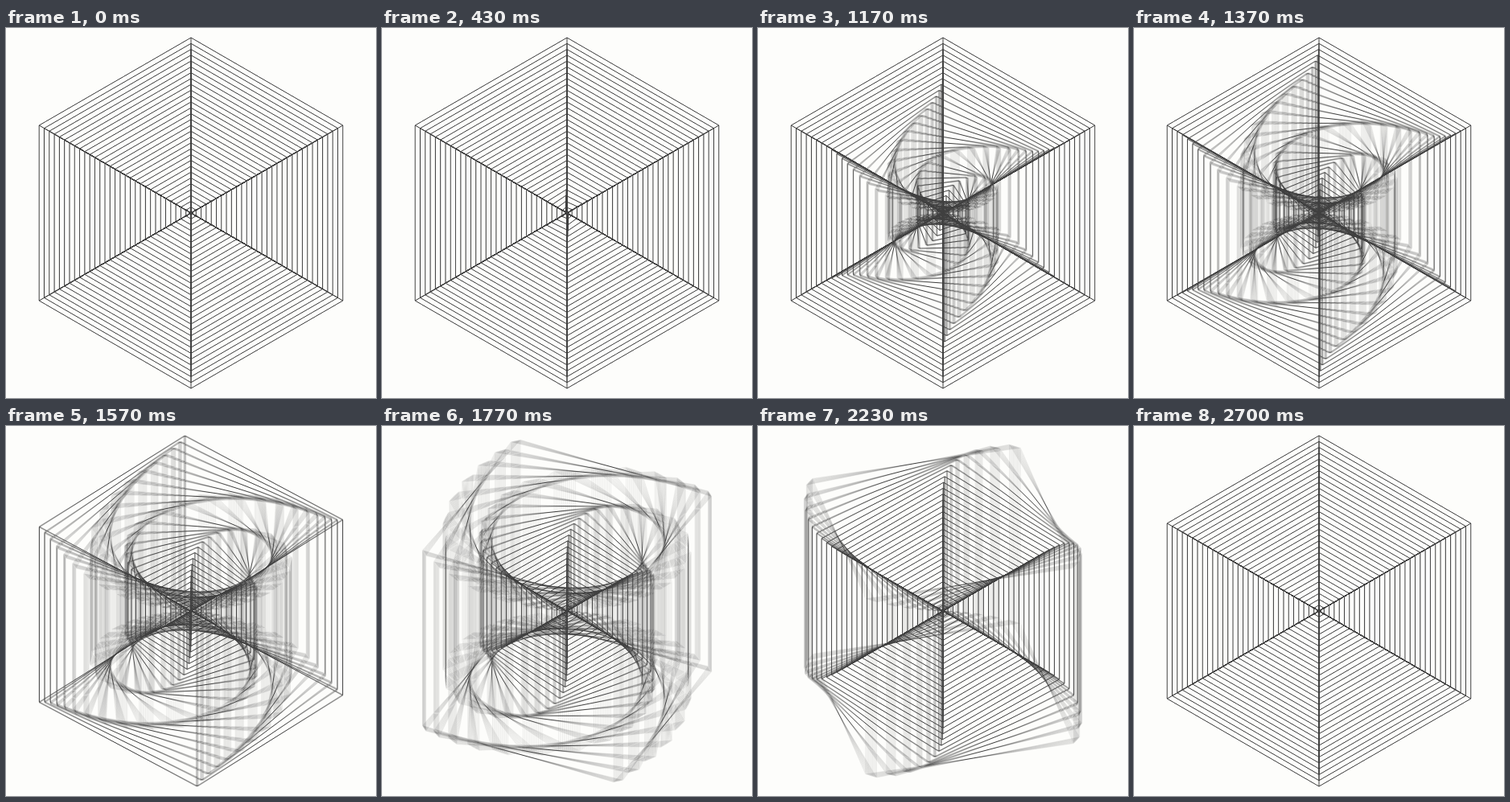
Write an HTML page with a canvas that moves like this. It is 460 px wide and 460 px high and loops after 2.76 s.

```html
<!DOCTYPE html>
<html lang="en">
<head>
<meta charset="utf-8">
<title>Nested turning cubes</title>
<style>
  html, body { margin: 0; width: 100%; height: 100%; overflow: hidden; background: #fdfdfb; }
  canvas { display: block; width: 100vmin; height: 100vmin; }
</style>
</head>
<body>
<canvas id="stage" width="460" height="460"></canvas>
<script>
const SIZE = 460;
const CENTER = SIZE / 2;
const LOOP = 2760;
const FRAME = 100 / 3;
const CUBES = 30;
const HALF_HEIGHT = 109;
const RADIUS = HALF_HEIGHT * Math.sqrt(3);
const TILT = 1 / Math.sqrt(3);

const FIRST_START = 70;
const STAGGER = 1305;
const TURN_TIME = 1300;
const SAMPLES = 12;
const SHUTTER = 0.8;

const stage = document.getElementById('stage').getContext('2d');
const layerCanvas = document.createElement('canvas');
layerCanvas.width = layerCanvas.height = SIZE;
const layer = layerCanvas.getContext('2d');
layer.strokeStyle = '#363636';
layer.lineWidth = 1;
layer.lineJoin = 'round';

const clamp = x => Math.min(1, Math.max(0, x));
const easeInOut = u => u < 0.5 ? 4 * u ** 3 : 1 - 4 * (1 - u) ** 3;

// One wireframe cube, seen isometrically, making a half turn about its upright axis.
function drawCube(scale, time) {
  const u = clamp((time - FIRST_START - STAGGER * scale) / TURN_TIME);
  const turn = Math.PI * easeInOut(u);
  const height = HALF_HEIGHT * scale;
  const corners = [0, 1, 2, 3].map(k => {
    const angle = turn + k * Math.PI / 2;
    return {
      x: CENTER - RADIUS * scale * Math.sin(angle),
      y: CENTER - RADIUS * scale * TILT * Math.cos(angle)
    };
  });
  layer.beginPath();
  for (const offset of [-height, height]) {
    corners.forEach((p, k) => layer[k ? 'lineTo' : 'moveTo'](p.x, p.y + offset));
    layer.closePath();
  }
  for (const p of corners) {
    layer.moveTo(p.x, p.y - height);
    layer.lineTo(p.x, p.y + height);
  }
  layer.stroke();
}

// Motion blur: the summed samples make an exact average.
function draw(time) {
  stage.clearRect(0, 0, SIZE, SIZE);
  stage.globalCompositeOperation = 'lighter';
  stage.globalAlpha = 1 / SAMPLES;
  for (let j = 0; j < SAMPLES; j++) {
    const shift = ((j + 0.5) / SAMPLES - 0.5) * SHUTTER * FRAME;
    layer.clearRect(0, 0, SIZE, SIZE);
    for (let i = 1; i <= CUBES; i++) drawCube(i / CUBES, time + shift);
    stage.drawImage(layerCanvas, 0, 0);
  }
}

const origin = performance.now();
let shown = -1;

function tick() {
  const time = (performance.now() - origin) % LOOP;
  const step = Math.floor((time + 5) / FRAME);
  if (step !== shown) {
    shown = step;
    draw(step * FRAME);
  }
  requestAnimationFrame(tick);
}
tick();
</script>
</body>
</html>
```
